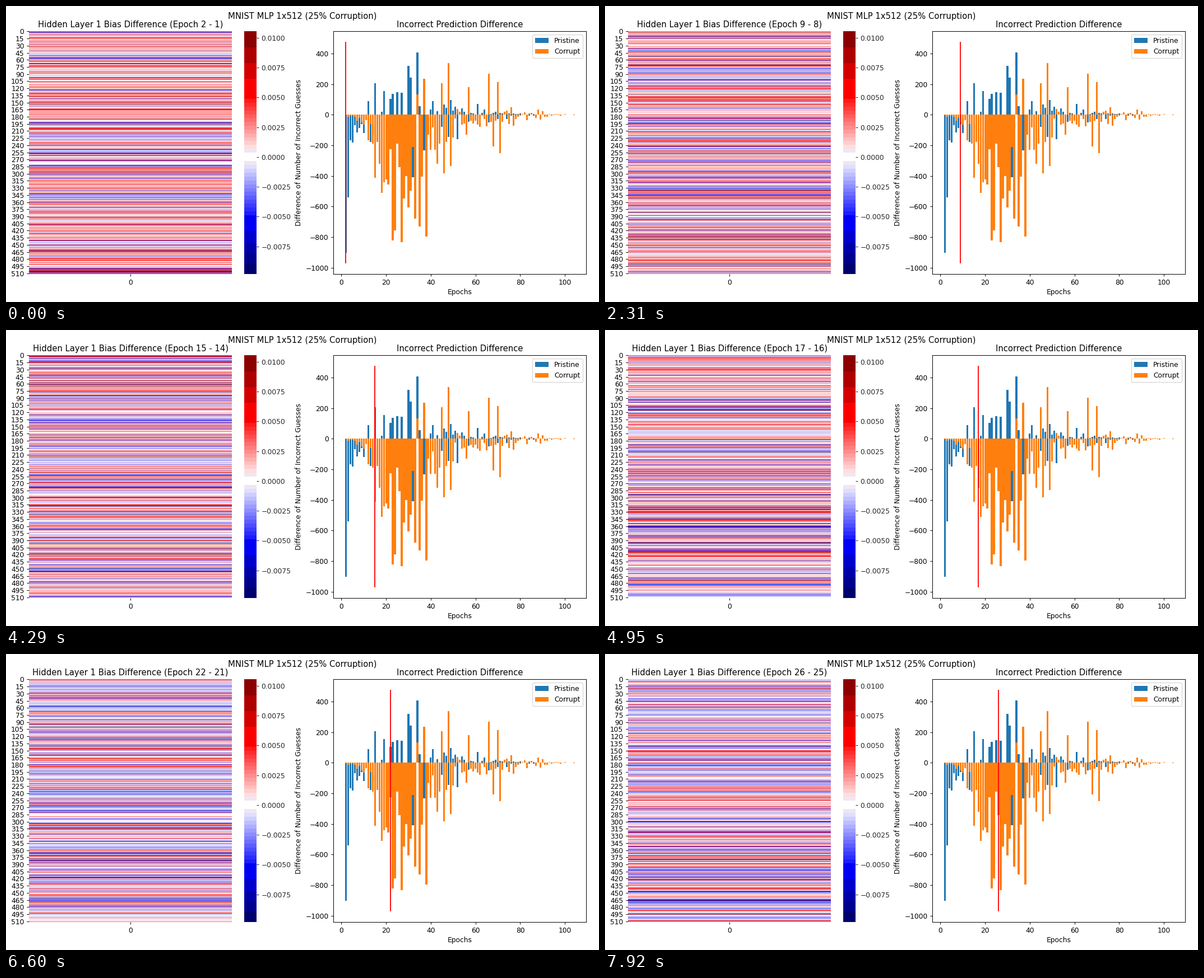
A matplotlib script for the animation above (8000 ms loop, 1058x529 px).

```python
import numpy as np
import matplotlib.pyplot as plt
from matplotlib.animation import FuncAnimation
from matplotlib.collections import PolyCollection
from matplotlib.colors import BoundaryNorm, ListedColormap

W, H = 1058, 529
LOOP, TICK, STEP = 8000, 80, 330   # ms: loop, drawing interval, time per epoch
STEPS = 25
ROWS, HEAT_H = 512, 434

plt.rcParams["font.family"] = "DejaVu Sans"
fig = plt.figure(figsize=(12, 6), dpi=H / 6, facecolor="white")


def add_axes(x0, x1, y0=50, y1=50 + HEAT_H):
    return fig.add_axes([x0 / W, y0 / H, (x1 - x0) / W, (y1 - y0) / H])


def hide_spines(ax):
    for spine in ax.spines.values():
        spine.set_visible(False)


# Stepped blue-white-red scale
def ramp(start, end, n):
    return [tuple(c) for c in np.linspace(start, end, n)]


def shades(levels, channel):
    out = []
    for level in levels:
        rgb = [0, 0, 0]
        rgb[channel] = level
        out.append(tuple(rgb))
    return out


LOW, HIGH = -0.00982, 0.01056
PALE = (240, 230, 243)
blues = (shades([110, 142, 168, 205, 244], 2)
         + ramp((28, 28, 255), (222, 222, 255), 13) + [PALE])
reds = ([PALE] + ramp((255, 222, 222), (255, 28, 28), 13)
        + shades([252, 212, 174, 140], 0))
bounds = np.concatenate([
    [LOW, -0.00893, -0.00809, -0.00724, -0.00621],
    np.linspace(-0.00489, -0.00034, 15),
    np.linspace(0.00037, 0.00487, 15),
    [0.00656, 0.00788, 0.00919, HIGH],
])
cmap = ListedColormap(np.array(blues + [(255, 255, 255)] + reds) / 255)
norm = BoundaryNorm(bounds, cmap.N)

# Bias differences: heavy-tailed noise around a drifting mean
rng = np.random.default_rng(512)
epochs = np.arange(2, 2 + STEPS)
mean = np.interp(epochs, [2, 5, 9, 13, 17, 22, 26],
                 [0.0007, 0.0016, 0.0009, 0.0004, 0.0007, 0.0, -0.0002])
bias = mean[:, None] + rng.laplace(0, 0.0023, (STEPS, ROWS))
bias = np.clip(bias, LOW * 0.99, HIGH * 0.99)


def shrink(colors):
    """Average the rows down to one colour per pixel line."""
    total = np.vstack([np.zeros(4), np.cumsum(colors, axis=0)])
    edges = np.linspace(0, ROWS, HEAT_H + 1)
    sums = [np.interp(edges, np.arange(ROWS + 1), c) for c in total.T]
    lines = np.diff(np.array(sums).T, axis=0) * HEAT_H / ROWS
    return np.uint8(np.clip(lines * 255 + 0.5, 0, 255))[:, None]


stripes = [shrink(colors) for colors in cmap(norm(bias))]

fig.suptitle("MNIST MLP 1x512 (25% Corruption)")

heat = add_axes(41, 403)
image = heat.imshow(stripes[0], aspect="auto", interpolation="nearest",
                    extent=(-0.5, 0.5, ROWS - 0.5, -0.5))
heat.set_xticks([0])
heat.set_yticks(range(0, ROWS, 15))
hide_spines(heat)
title = heat.set_title("", y=1)

scale = add_axes(425.3, 447)
scale.pcolormesh([0, 1], bounds, (bounds[:-1, None] + bounds[1:, None]) / 2,
                 cmap=cmap, norm=norm)
scale.set_ylim(LOW, HIGH)
scale.set_xticks([])
scale.yaxis.tick_right()
scale.set_yticks(np.arange(-3, 5) * 0.0025)
scale.tick_params(colors="#262626")
hide_spines(scale)

# Change in wrong guesses per epoch, starting at epoch 2
pristine = [
    -902, -539, -167, -183, -70, -115, -88, -62, -120, 0, 90, -180, 0, 205, 0,
    0, 18, 154, 0, 0, 105, 138, 0, 148, 0, 144, 0, 0, 318, 243, -410, 0, 407,
    55, 0, -235, 0, 0, 32, 90, 0, 22, 0, -80, 68, 45, -145, 96, 25, 52, -160,
    0, 42, 18, 0, -48, 12, 8, 0, 70, 0, 10, 35, -52, -52, 5, 10, 20, -28, 12,
    8, 6, -30, 8, -8, 8, 6, 4, 8, 0, 0, 0, -8, 0, -5,
]
corrupt = [
    -2, -15, -8, -5, -12, -40, -22, -50, -65, -35, -168, -60, -190, -412, -180,
    -322, -510, -442, -422, -455, -225, -822, -757, -190, -342, -832, -547,
    -400, -606, -495, -210, -680, 132, -732, -405, 234, -797, -132, -228, -85,
    -228, -320, -190, 207, -382, -178, 337, -335, -148, -25, 38, 20, -65, -58,
    -130, 180, -40, -58, -38, -65, -80, -8, -30, -75, 267, -48, -208, -40, 212,
    -253, -45, 18, 25, -60, 50, -72, -30, -12, -8, 5, 15, -35, 8, 12, 5, -20,
    32, -32, 22, -15, -12, 5, -5, -3, 4, -3, -8, 2, 4, 1, 0, 0, -3,
]


def add_bars(ax, values, color, label):
    boxes = [[(x - 0.4, 0), (x - 0.4, v), (x + 0.4, v), (x + 0.4, 0)]
             for x, v in enumerate(values, 2) if v]
    ax.add_collection(PolyCollection(boxes, facecolor=color, linewidth=0,
                                     label=label))


bars = add_axes(584.2, 1035.3)
add_bars(bars, pristine, "C0", "Pristine")
add_bars(bars, corrupt, "C1", "Corrupt")
marker, = bars.plot([2, 2], [-970, 474], color="red", lw=1.5, zorder=3)
bars.set_xlim(-3.54, 109.54)
bars.set_ylim(-1042, 546)
bars.set_title("Incorrect Prediction Difference", y=1)
bars.set_xlabel("Epochs")
bars.set_ylabel("Difference of Number of Incorrect Guesses")
bars.legend(loc="upper right")


def update(frame):
    # A step that begins within this drawing interval shows from its start
    step = min((frame * TICK + TICK - 1) // STEP, STEPS - 1)
    epoch = step + 2
    image.set_data(stripes[step])
    title.set_text(f"Hidden Layer 1 Bias Difference (Epoch {epoch} - {epoch - 1})")
    marker.set_xdata([epoch, epoch])
    return image, title, marker


anim = FuncAnimation(fig, update, frames=LOOP // TICK, interval=TICK,
                     repeat=True, repeat_delay=0, blit=False)
plt.show()
```
